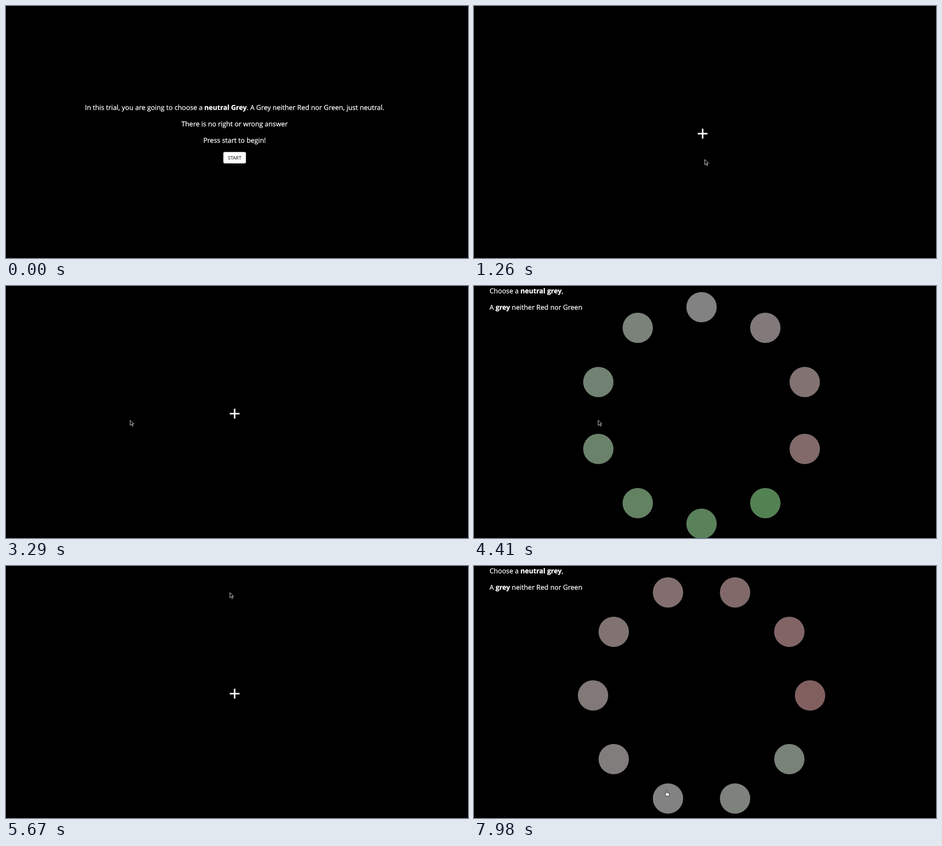
An HTML page that plays this animation: 1012 by 553 pixels, repeating every 8 s.

```html
<!DOCTYPE html>
<html lang="en">
<head>
<meta charset="utf-8">
<title>Neutral grey trial</title>
<style>
  html, body { margin: 0; width: 100%; height: 100%; overflow: hidden; background: #000; }
  svg { display: block; width: 1012px; height: 553px; }
  text {
    font: 14.84px "Open Sans", sans-serif; text-rendering: geometricPrecision;
    fill: #fff; stroke: #fff; stroke-width: .3;
  }
  tspan { font-weight: 700; }
  #intro text { text-anchor: middle; }
  #intro .label { font-size: 10.4px; fill: #333; stroke: #333; stroke-width: .2; }
  #button { fill: #fff; stroke: #ccc; stroke-width: .5; }
  #button.hover { fill: #ddd; stroke: #aaa; }
  #ring circle { stroke: #969696; stroke-opacity: .5; stroke-width: .7; }
</style>
</head>
<body>
<svg viewBox="0 0 1012 553">
  <g id="intro">
    <text x="500.7" y="228.2">In this trial, you are going to choose a <tspan>neutral Grey</tspan>. A Grey neither Red nor Green, just neutral.</text>
    <text x="500.7" y="264.2">There is no right or wrong answer</text>
    <text x="500.7" y="300.2">Press start to begin!</text>
    <rect id="button" x="476.2" y="320.6" width="49.2" height="24.6" rx="3"/>
    <text class="label" x="500.7" y="336.7">START</text>
  </g>
  <path id="cross" d="M490.1 280.1h21.4M500.8 269.2v21.8" stroke="#fff" stroke-width="3.4"/>
  <g id="choice">
    <text x="34" y="16.1">Choose a <tspan>neutral grey</tspan>,</text>
    <text x="34" y="52.1">A <tspan>grey</tspan> neither Red nor Green</text>
    <g id="ring"></g>
  </g>
  <g id="cursor">
    <path id="arrow" d="M0 0V11.3L2.7 8.9L4.6 13L6.5 12.2L4.7 8.2H8.2Z" fill="#000" stroke="#fff" stroke-width=".9"/>
    <path id="hand" d="M-1.2 7.2V1q0-1.3 1.1-1.3t1.1 1.3V4.5q1-.8 2 .3q1.2-.6 1.9.5q1.4-.2 1.4 1.2V9q0 1.5-1 3V13H-.6V12L-3.6 8.4q-.8-1.3.2-1.7q.9-.3 2.2 1.4ZM1 4.5V7M3 5V7M4.9 5.5V7.3" fill="#fff" stroke="#000" stroke-width=".8"/>
  </g>
</svg>
<script>
const LOOP = 8000, STEP = 70, COUNT = 10, DOT = 33;
const $ = id => document.getElementById(id);
const show = (id, on) => { $(id).style.display = on ? '' : 'none'; };

// Tints rise clockwise from green through the grey dot to red
const rings = [
  { from: 2380, to: 3290, turn: 0, grey: 5, step: 10.4 },
  { from: 4410, to: 5670, turn: 18, grey: 7, step: 8 },
  { from: 6790, to: LOOP, turn: 0, grey: 3, step: 5 }
];

function makeDot({ turn, grey, step }, i) {
  const angle = (turn + 360 / COUNT * i) * Math.PI / 180;
  const tint = (i - grey) * step;
  const red = 130 + Math.min(tint, 0), green = 130 - Math.max(tint, 0);
  return {
    x: 498.4 + 237.7 * Math.cos(angle),
    y: 284.1 + 237.7 * Math.sin(angle),
    fill: `rgb(${red},${green},${Math.min(red, green)})`
  };
}
for (const ring of rings) {
  ring.dots = Array.from({ length: COUNT }, (_, i) => makeDot(ring, i + 1));
}

// Cursor moves along curves: start, end, first point, control point, last point
const button = [505.5, 337], left = [272, 294.5], top_ = [490.5, 58.5];
const moves = [
  [70, 560, [494, 537], [525, 430], [509, 345]],
  [700, 1050, [508, 338], [507, 337], button],
  [2730, 3220, button, [390, 325], left],
  [4830, 5600, left, [370, 160], top_],
  [7210, 7980, top_, [286, 330], [421.5, 492]]
];

function cursorAt(t) {
  const [start, end, a, b, c] = moves.findLast(m => m[0] <= t) || moves[0];
  const p = Math.min(1, Math.max(0, (t - start) / (end - start)));
  const u = p * p * (3 - 2 * p), v = 1 - u;
  return a.map((n, i) => v * v * n + 2 * u * v * b[i] + u * u * c[i]);
}

let shown;
function drawRing(ring) {
  if (ring === shown) return;
  shown = ring;
  $('ring').innerHTML = ring ? ring.dots.map(d =>
    `<circle cx="${d.x}" cy="${d.y}" r="${DOT}" fill="${d.fill}"/>`).join('') : '';
}

const began = performance.now();
function frame() {
  const now = (performance.now() - began) % LOOP;
  const t = Math.floor(now / STEP) * STEP;
  const ring = rings.find(r => t >= r.from && t < r.to);
  const intro = t < 1190;
  const [x, y] = cursorAt(t);
  const pointing = (t >= 700 && t < 1260) ||
    (ring && ring.dots.some(d => Math.hypot(d.x - x, d.y - y) < DOT));

  show('intro', intro);
  show('cross', !intro && !ring);
  show('choice', ring);
  drawRing(ring);
  $('button').classList.toggle('hover', t >= 700);
  show('cursor', t >= 70);
  show('arrow', !pointing);
  show('hand', pointing);
  $('cursor').setAttribute('transform', `translate(${x} ${y})`);
  requestAnimationFrame(frame);
}
frame();
</script>
</body>
</html>
```
